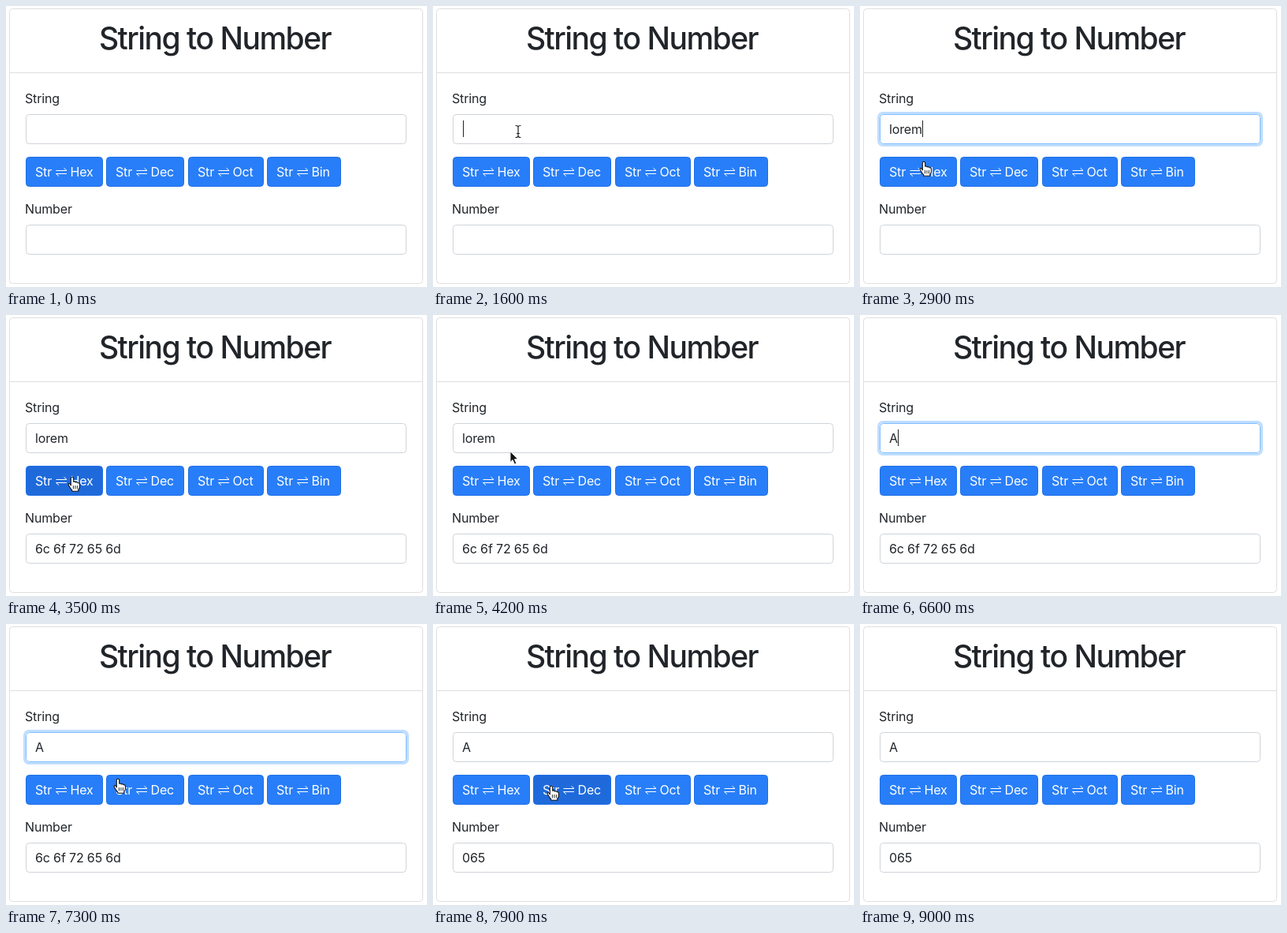
Animation, 534 px wide and 356 px high, one loop 9.2 s. Source, as an HTML page:

```html
<!DOCTYPE html>
<html lang="en">
<head>
<meta charset="utf-8">
<title>String to Number</title>
<style>
html, body { margin: 0; width: 100%; height: 100%; overflow: hidden; background: #fff; }
svg { display: block; width: 534px; height: 356px; }
text { font: 400 16px Inter, "Open Sans", sans-serif; font-optical-sizing: none; letter-spacing: -.15px; fill: #212529; white-space: pre; }
.title { font-size: 39px; font-weight: 500; letter-spacing: -1.5px; text-anchor: middle; }
.line { fill: none; stroke: #dfdfdf; }
.field { fill: #fff; stroke: #ced4da; }
.button text { fill: #fff; }
.button path { fill: none; stroke: #fff; }
.cursor { stroke-linejoin: round; stroke-linecap: round; }
</style>
</head>
<body>
<svg viewBox="0 0 534 356">
  <rect class="line" x="4.5" y="3.5" width="524" height="348" rx="4"/>
  <path class="line" d="M5 84.5H528"/>
  <text class="title" x="265" y="55">String to Number</text>
  <text x="24" y="123">String</text>
  <text x="24" y="263">Number</text>

  <rect id="glow" x="23.5" y="135.5" width="486" height="41" rx="5.5" fill="none" stroke="#bfdeff" stroke-width="3"/>
  <rect id="input" class="field" x="25.5" y="137.5" width="482" height="37" rx="4"/>
  <rect class="field" x="25.5" y="277.5" width="482" height="37" rx="4"/>
  <rect id="selection" x="38" y="145" width="40" height="21" fill="#b0d5f5"/>
  <text id="word" x="37" y="162"></text>
  <text id="number" x="37" y="302"></text>
  <rect id="caret" y="145" width="1" height="21" fill="#222"/>
  <g id="buttons"></g>

  <g id="ibeam" class="cursor" fill="none">
    <path d="M-3-7.5Q0-7.5 0-5.5Q0-7.5 3-7.5M0-5.5V5.5M-3 7.5Q0 7.5 0 5.5Q0 7.5 3 7.5M-1.5 2.5H1.5" stroke="#fff" stroke-width="2.6"/>
    <path d="M-3-7.5Q0-7.5 0-5.5Q0-7.5 3-7.5M0-5.5V5.5M-3 7.5Q0 7.5 0 5.5Q0 7.5 3 7.5M-1.5 2.5H1.5" stroke="#222" stroke-width="1.2"/>
  </g>
  <path id="arrow" class="cursor" d="M0 0V13.5L3.1 10.6L5.4 16L7.8 15L5.5 9.7H9.6Z" fill="#111" stroke="#fff" stroke-width=".9"/>
  <g id="hand" class="cursor" fill="#fff" stroke="#111" stroke-width="1.1">
    <path d="M-1.7 10V1Q-1.7-.7 0-.7T1.7 1V5.3Q3.2 4.3 4.3 6Q6 5 7 6.8Q9.4 6.2 9.4 8.8V11.5Q9.4 13.7 7.8 15.2V17.2H-.3V15.8Q-2.5 13.6-4.7 9.4Q-5.4 7.4-3.4 7.6Q-2.4 8.2-1.7 10Z"/>
    <path d="M1.4 10.5V14M3.9 10.5V14M6.4 10.5V14" fill="none" stroke-width=".9"/>
  </g>
</svg>
<script>
const LOOP = 9200, STEP = 100, FADE = 150;
const el = id => document.getElementById(id);
const show = (id, on) => el(id).setAttribute('visibility', on ? 'visible' : 'hidden');
const within = (v, a, b) => v >= a && v < b;
const ramp = (t, start) => Math.max(0, Math.min(1, (t - start) / FADE));
const pulse = (t, on, off) => ramp(t, on) - ramp(t, off);
const mix = (a, b, k) => `rgb(${a.map((v, i) => Math.round(v + (b[i] - v) * k))})`;

const BLUE = [40, 126, 248], BLUE_HOVER = [31, 106, 219];
const BORDER = [206, 212, 218], BORDER_FOCUS = [128, 189, 255];

const BUTTONS = [['Hex', 25, 98], ['Dec', 127, 99], ['Oct', 231, 96], ['Bin', 331, 94]];
el('buttons').innerHTML = BUTTONS.map(([name, x, w]) => `
  <g class="button" transform="translate(${x} 191)">
    <rect x=".5" y=".5" width="${w - 1}" height="37" rx="4" fill="${mix(BLUE, BLUE, 0)}" stroke="#1f6fe5"/>
    <text x="12" y="25">Str</text>
    <path d="M38.5 17.5H52L48.5 14.3M52 21.5H38.5L42 24.7"/>
    <text x="56.5" y="25">${name}</text>
  </g>`).join('');
const faces = document.querySelectorAll('.button rect');

// Pointer hotspot: time, x, y
const PATH = [
  [100, 190, 352], [900, 108, 159], [2400, 108, 159], [2900, 81, 198],
  [3100, 84, 206], [3900, 84, 206], [4200, 98, 173], [4400, 104, 164],
  [6900, 104, 164], [7300, 142, 197], [7500, 150, 206], [8500, 150, 206], [9000, 165, 365]
];

function pointer(t) {
  const i = PATH.findIndex(p => p[0] > t);
  if (i < 1) return null;
  const [t0, x0, y0] = PATH[i - 1], [t1, x1, y1] = PATH[i];
  const k = (t - t0) / (t1 - t0), e = k * k * (3 - 2 * k);
  return [x0 + (x1 - x0) * e, y0 + (y1 - y0) * e];
}

function drawPointer(t) {
  const hidden = within(t, 2000, 2400) || within(t, 6600, 7000);
  const p = hidden ? null : pointer(t);
  let shape = '';
  if (p) {
    const [x, y] = p;
    const onButton = within(y, 191, 229) && BUTTONS.some(([, left, w]) => within(x, left, left + w));
    const onField = within(x, 25, 508) && (within(y, 137, 172) || within(y, 277, 315));
    shape = onButton ? 'hand' : onField ? 'ibeam' : 'arrow';
    el(shape).setAttribute('transform', `translate(${x} ${y})`);
  }
  for (const id of ['hand', 'ibeam', 'arrow']) show(id, id === shape);
}

function draw(t) {
  const typed = Math.max(0, Math.floor((t - 1900) / 100));
  const word = el('word');
  word.textContent = t < 6600 ? 'lorem'.slice(0, typed) : 'A';
  el('number').textContent = t < 3400 ? '' : t < 7600 ? '6c 6f 72 65 6d' : '065';

  const focus = pulse(t, 1600, 3200) + pulse(t, 4600, 7500);
  el('glow').setAttribute('opacity', focus);
  el('input').style.stroke = mix(BORDER, BORDER_FOCUS, focus);
  show('selection', within(t, 5100, 6600));
  show('caret', within(t, 1600, 3200) || within(t, 4600, 5100) || within(t, 6600, 7100));
  el('caret').setAttribute('x', word.textContent ? Math.round(37.5 + word.getComputedTextLength()) : 38);

  faces[0].setAttribute('fill', mix(BLUE, BLUE_HOVER, pulse(t, 2900, 4000)));
  faces[1].setAttribute('fill', mix(BLUE, BLUE_HOVER, pulse(t, 7300, 8600)));
  drawPointer(t);
}

const start = performance.now();
function tick() {
  const t = (performance.now() - start) % LOOP;
  draw(Math.floor(t / STEP) * STEP);
  requestAnimationFrame(tick);
}
tick();
</script>
</body>
</html>
```
